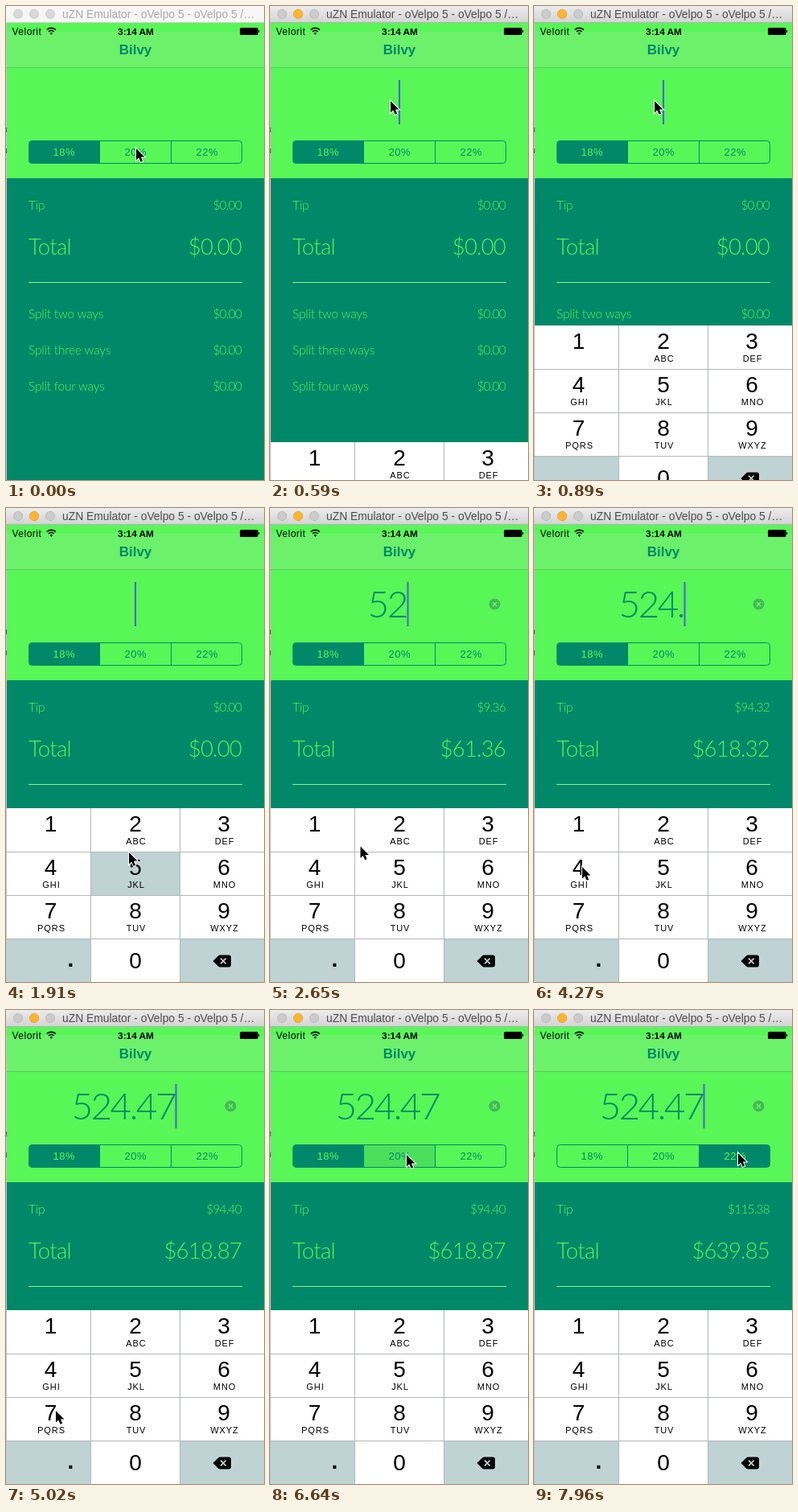
An HTML page that plays this animation: 321 px wide and 589 px high, repeating every 8000 ms.

```html
<!DOCTYPE html>
<html lang="en">
<head>
<meta charset="utf-8">
<title>Tip calculator</title>
<style>
  html, body { margin: 0; width: 100%; height: 100%; overflow: hidden; background: #008868; }
  svg { display: block; width: 100%; height: 100%; }
  text { font-family: "Liberation Sans", Arial, sans-serif; white-space: pre; }
  .thin { font-family: Lato, "Open Sans", sans-serif; font-weight: 300; }
  .row { font-size: 15.5px; fill: #58f657; letter-spacing: -.2px; }
  .sum { font-size: 15.5px; fill: #58f657; letter-spacing: -.8px; text-anchor: end; }
  .big { font-size: 27.5px; letter-spacing: -.7px; }
  .big.sum { letter-spacing: -.8px; }
  .bill { font-size: 46px; letter-spacing: -2.6px; fill: #008868; }
  .mid { text-anchor: middle; }
  .seg { font-size: 13px; letter-spacing: .6px; }
  .digit { font-size: 28px; }
  .abc { font-size: 11px; letter-spacing: .9px; }
</style>
</head>
<body>
<svg id="stage" viewBox="0 0 321 589" preserveAspectRatio="none">
  <defs>
    <linearGradient id="bar" x2="0" y2="1">
      <stop offset="0" stop-color="#ececec"/><stop offset="1" stop-color="#d3d3d3"/>
    </linearGradient>
    <clipPath id="segClip"><rect x="28.5" y="167.5" width="265" height="28" rx="4"/></clipPath>
  </defs>
</svg>
<script>
const GREEN = '#58f657', TEAL = '#008868', GREY = '#bfd2d4';
const LOOP = 8000, STEP = 147.3;
const stage = document.getElementById('stage');

function add(tag, attrs, parent = stage, text) {
  const node = document.createElementNS('http://www.w3.org/2000/svg', tag);
  set(node, attrs);
  if (text !== undefined) node.textContent = text;
  parent.appendChild(node);
  return node;
}
function set(node, attrs) {
  for (const name in attrs) node.setAttribute(name, attrs[name]);
}
const rect = (x, y, width, height, fill, parent, more) =>
  add('rect', { x, y, width, height, fill, ...more }, parent);
const label = (x, y, text, cls, parent, more) =>
  add('text', { x, y, class: cls, ...more }, parent, text);
const path = (d, attrs, parent) => add('path', { d, fill: 'none', ...attrs }, parent);

// Green header and window title
rect(0, 0, 321, 589, GREEN);
rect(0, 32, 321, 44, '#6cf16b');
rect(0, 76, 321, 1, '#5cc860');
const titleBar = rect(0, 0, 321, 21, '#f6f6f6');
const titleEdge = rect(0, 20, 321, 1, '#d2d2d2');
const lights = [15, 35, 55].map(cx =>
  add('circle', { cx, cy: 10, r: 5.7, 'stroke-width': .8 }));
const title = label(70, 15, 'uZN Emulator - oVelpo 5 - oVelpo 5 /…', '', stage, { 'font-size': 13.85 });

// Status bar
label(7.5, 36, 'Velorit', '', stage, { 'font-size': 12, 'letter-spacing': .5 });
path('M50.8 29.6a8 8 0 0 1 11 0M53 32a4.8 4.8 0 0 1 6.6 0', { stroke: '#000', 'stroke-width': 1.7 });
path('M54.5 33.7a2.7 2.7 0 0 1 3.6 0l-1.8 2z', { fill: '#000' });
label(161.5, 36, '3:14 AM', 'mid', stage, { 'font-size': 11.8, 'font-weight': 700 });
rect(291, 27, 22.5, 9, '#000', stage, { rx: 1.5 });
rect(313.8, 30, 1.4, 3, '#000', stage, { rx: .7 });
label(161, 60, 'Bilvy', 'mid', stage, { 'font-size': 17, 'font-weight': 700, fill: TEAL });

// Bill field
const billText = label(145.7, 135.5, '', 'thin bill mid');
const caret = rect(160, 92, 2, 55, '#4a63d0');
const clear = add('g', {});
add('circle', { cx: 279.5, cy: 119.5, r: 7, fill: '#42bd54' }, clear);
path('M277 117l5 5m0-5l-5 5', { stroke: '#79ee7b', 'stroke-width': 1.2 }, clear);

// Rate picker
const picker = add('g', { 'clip-path': 'url(#segClip)' });
const rates = [18, 20, 22];
const segs = rates.map((rate, n) => ({
  box: rect(28 + n * 88.5, 167, 89, 29, 'none', picker),
  text: label(72.3 + n * 89, 186, rate + '%', 'seg mid')
}));
path('M116.5 168v27M205.5 168v27', { stroke: TEAL });
rect(28.5, 167.5, 265, 28, 'none', stage, { rx: 4, stroke: TEAL });

// Results
rect(0, 214, 321, 375, TEAL);
rect(28, 343, 266, 1, '#94f28e');
const sums = [
  ['Tip', 253], ['Total', 309, ' big'],
  ['Split two ways', 388], ['Split three ways', 433], ['Split four ways', 478]
].map(([name, y, size = '']) => {
  label(28, y, name, 'thin row' + size);
  return label(293, y, '', 'thin sum' + size);
});

// Keypad
const pad = add('g', {});
const keys = {};
const columns = [[1, 105, 55.5], [105, 111, 161], [216, 105, 271]];
['1', '2 ABC', '3 DEF', '4 GHI', '5 JKL', '6 MNO', '7 PQRS', '8 TUV', '9 WXYZ', '.', '0', 'del']
  .forEach((name, n) => {
    const [x, width, mid] = columns[n % 3];
    const y = 373 + Math.floor(n / 3) * 54;
    const [digit, abc] = name.split(' ');
    const idle = digit === '.' || digit === 'del' ? GREY : '#fff';
    keys[digit] = { idle, box: rect(x, y, width, 55, idle, pad) };
    if (digit === '.') label(80.5, 570, '.', 'digit mid', pad, { 'font-weight': 700 });
    else if (digit !== 'del') label(mid, y + (digit === '0' ? 37 : 29), digit, 'digit mid', pad);
    if (abc) label(mid + 1, y + 45, abc, 'abc mid', pad);
  });
path('M1 427.5H321M1 481.5H321M1 535.5H321M105.5 373V589M216.5 373V589', { stroke: '#b2b8ba' }, pad);
path('M257.5 563l6.5-6.5q1-1 2.5-1H277a3 3 0 0 1 3 3v9a3 3 0 0 1-3 3H266.5q-1.5 0-2.5-1z', { fill: '#000' }, pad);
path('M267 559.7l6.6 6.6m0-6.6l-6.6 6.6', { stroke: GREY, 'stroke-width': 1.7 }, pad);

// Window edge with a sliver of the desktop behind it
rect(0, 21, 1, 568, '#c3c6c4');
rect(0, 151, 1, 6, '#7a4a78');
rect(0, 177, 1, 6, '#7a4a78');

const pointer = path('M0 0V14.6L3.3 11.5L5.6 16.8L8.1 15.7L5.9 10.6H10.4Z',
  { fill: '#000', stroke: '#fff', 'stroke-width': 2, 'paint-order': 'stroke' });

// Step, x, y
const route = [
  [0, 162, 177], [3, 150, 118], [8, 150, 118], [12, 153, 428], [14, 153, 428],
  [16, 163, 396], [17, 163, 396], [19, 62, 445], [21, 62, 445], [24, 134, 584],
  [26, 84, 562], [27, 84, 562], [29, 60, 446], [31, 60, 446], [33, 62, 498],
  [34, 62, 498], [39, 186, 182], [41, 178, 180], [42, 174, 180], [43, 174, 180],
  [44, 170, 180], [49, 170, 180], [52, 254, 178], [55, 254, 178]
];
// Step at which each key is released
const typing = [[14, '5'], [17, '2'], [21, '4'], [27, '.'], [31, '4'], [34, '7']];
const ACTIVE = 2, FOCUS = 4;

function pointerAt(step) {
  const n = Math.max(1, route.findIndex(p => p[0] >= step));
  const [s0, x0, y0] = route[n - 1], [s1, x1, y1] = route[n];
  const k = (step - s0) / (s1 - s0), e = k * k * (3 - 2 * k);
  return [x0 + (x1 - x0) * e, y0 + (y1 - y0) * e];
}

// Critically damped slide from below the stage
function padOffset(step) {
  const u = Math.max(0, step - 3.4) * 1.45;
  return Math.round(216 * (1 + u) * Math.exp(-u));
}

function drawWindow(active) {
  set(titleBar, { fill: active ? 'url(#bar)' : '#f6f6f6' });
  set(titleEdge, { fill: active ? '#b2b2b2' : '#d2d2d2' });
  set(title, { fill: active ? '#4c4c4c' : '#a9a9a9' });
  lights.forEach((light, n) => {
    const yellow = active && n === 1;
    set(light, {
      fill: yellow ? '#fdb52f' : active ? '#cbcbcb' : '#d8d8d8',
      stroke: yellow ? '#e0a030' : active ? '#b9b9b9' : '#cdcdcd'
    });
  });
}

function drawBill(step, text) {
  const last = typing.reduce((at, [s]) => s <= step ? s : at, FOCUS);
  const lit = step >= FOCUS && (step - last + .3) % 6.6 < 3.6;
  const dots = text.includes('.') ? 1 : 0;
  const half = ((text.length - dots) * 24 + dots * 8) / 2;
  billText.textContent = text;
  set(caret, { x: text ? 146.5 + half : 160, visibility: lit ? 'visible' : 'hidden' });
  set(clear, { visibility: text ? 'visible' : 'hidden' });
}

function drawPicker(chosen, pressed) {
  segs.forEach(({ box, text }, n) => {
    set(box, { fill: n === chosen ? TEAL : n === pressed ? '#4ae05b' : 'none' });
    set(text, { fill: n === chosen ? GREEN : TEAL });
  });
}

function draw(time) {
  const step = Math.floor((time % LOOP + 8) / STEP);
  const text = typing.filter(([s]) => s <= step).map(([, key]) => key).join('');
  const chosen = step >= 53 ? 2 : step >= 46 ? 1 : 0;
  const pressed = step === 52 ? 2 : step === 44 || step === 45 ? 1 : -1;

  drawWindow(step >= ACTIVE);
  drawBill(step, text);
  drawPicker(chosen, pressed);

  const bill = Number(text || 0), tip = bill * rates[chosen] / 100, total = bill + tip;
  [tip, total, total / 2, total / 3, total / 4].forEach((value, n) => {
    sums[n].textContent = '$' + value.toFixed(2);
  });

  const held = typing.find(([s]) => s === step + 1);
  for (const name in keys) {
    const { box, idle } = keys[name];
    const down = held && held[1] === name;
    set(box, { fill: down ? (idle === GREY ? '#fff' : GREY) : idle });
  }
  set(pad, { transform: `translate(0 ${padOffset(step)})` });
  set(pointer, { transform: `translate(${pointerAt(step)})` });
}

let start;
function tick(now) {
  start ??= now;
  draw(now - start);
  requestAnimationFrame(tick);
}
draw(0);
requestAnimationFrame(tick);
</script>
</body>
</html>
```
